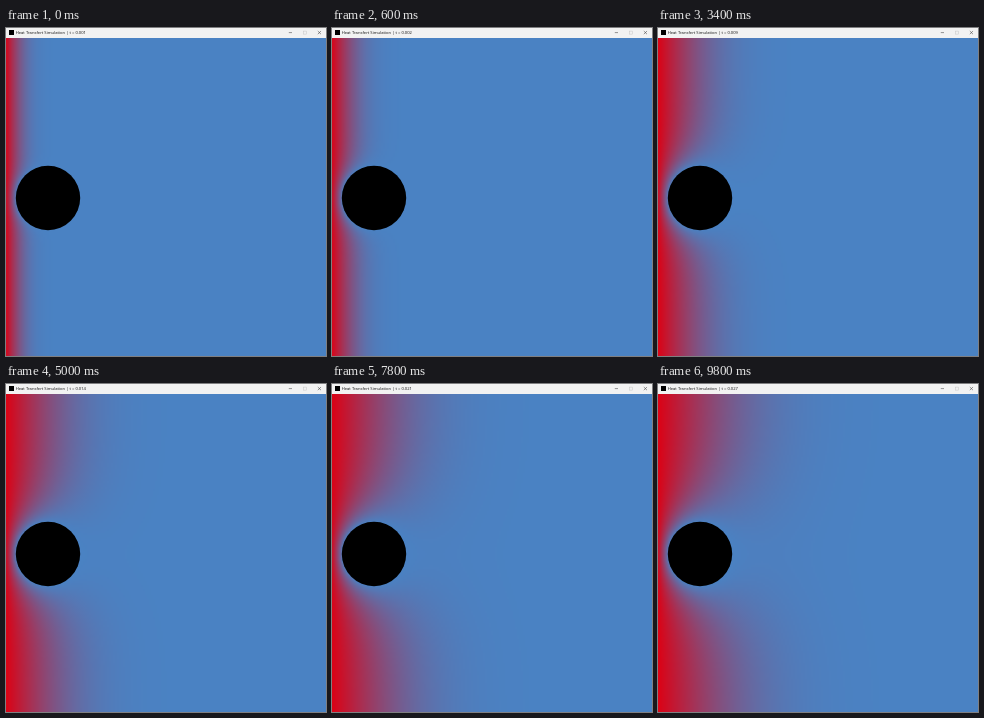
Recreate the animation shown at these times as an HTML page with a canvas. Size 320 by 328 pixels, loop 10 s.

```html
<!DOCTYPE html>
<html lang="en">
<head>
<meta charset="utf-8">
<title>Heat simulation</title>
<style>
  html, body { margin: 0; width: 100%; height: 100%; overflow: hidden; background: #4a82c3; }
  #stage { position: relative; width: 320px; height: 328px; overflow: hidden; }
  #heat { position: absolute; left: 0; top: 10px; width: 320px; height: 318px; }
  svg { position: absolute; inset: 0; }
  text { font: 4.15px "Open Sans", "Noto Sans", sans-serif; fill: #111; }
</style>
</head>
<body>
<div id="stage">
  <canvas id="heat" width="160" height="159"></canvas>
  <svg width="320" height="328" viewBox="0 0 320 328">
    <rect width="320" height="10" fill="#f2f2f2"/>
    <rect x="3" y="2" width="5" height="5" fill="#000"/>
    <text id="title" x="9.7" y="6.2"></text>
    <g fill="none" stroke="#333" stroke-width=".5">
      <path d="M282.8 4.6h3.2M311.8 3l3.2 3.2m0-3.2l-3.2 3.2"/>
      <rect x="297.6" y="3.1" width="3" height="3" stroke="#c4c4c4"/>
    </g>
    <circle cx="42" cy="170" r="32.2"/>
  </svg>
</div>
<script>
const start = performance.now();
const STEP = 200, FRAMES = 50, CELL = 2, COLS = 160, ROWS = 159;
const HOT = [222, 0, 18], COLD = [74, 130, 195];
const DISC = { x: 42, y: 160, r: 32 };

// Simulated time at a few frames; linear in between.
const clock = [[0, .0012], [3, .0026], [17, .0097], [25, .0142], [32, .0182], [39, .0217], [49, .0274]];
function simTime(frame) {
  const i = Math.max(1, clock.findIndex(([f]) => f >= frame));
  const [f0, t0] = clock[i - 1], [f1, t1] = clock[i];
  return t0 + (t1 - t0) * (frame - f0) / (f1 - f0);
}

// Grid with one border cell on each side; the left border is the heat source.
const W = COLS + 2, H = ROWS + 2;
let field = new Float32Array(W * H), next = new Float32Array(W * H);
const open = new Uint8Array(W * H);
for (let y = 0; y < H; y++) {
  field[y * W] = next[y * W] = 1;
  for (let x = 1; x <= COLS; x++) {
    const dx = (x - .5) * CELL - DISC.x, dy = (y - .5) * CELL - DISC.y;
    open[y * W + x] = Math.hypot(dx, dy) > DISC.r ? 1 : 0;
  }
}

function diffuse(k) {
  for (let y = 1; y <= ROWS; y++) {
    for (let i = y * W + 1, end = i + COLS; i < end; i++) {
      if (open[i]) {
        next[i] = field[i] + k * (field[i - 1] + field[i + 1] + field[i - W] + field[i + W] - 4 * field[i]);
      }
    }
    next[y * W + COLS + 1] = next[y * W + COLS];
  }
  next.copyWithin(0, W, 2 * W);
  next.copyWithin((H - 1) * W, (H - 2) * W, (H - 1) * W);
  [field, next] = [next, field];
}

const cellArea = (CELL / 320) ** 2;
const history = [];
for (let frame = 0, t = 0; frame < FRAMES; frame++) {
  const span = simTime(frame) - t;
  const steps = Math.ceil(span / (.24 * cellArea));
  for (let s = 0; s < steps; s++) diffuse(span / steps / cellArea);
  t += span;
  history.push(field.slice());
}

const ctx = document.getElementById("heat").getContext("2d");
const image = ctx.createImageData(COLS, ROWS);
const title = document.getElementById("title");

function draw(frame) {
  const heat = history[frame];
  for (let y = 0, p = 0; y < ROWS; y++) {
    for (let x = 0; x < COLS; x++, p += 4) {
      const u = heat[(y + 1) * W + x + 1];
      for (let c = 0; c < 3; c++) image.data[p + c] = COLD[c] + (HOT[c] - COLD[c]) * u;
      image.data[p + 3] = 255;
    }
  }
  ctx.putImageData(image, 0, 0);
  const shown = Math.floor(simTime(frame) * 1000) / 1000;
  title.textContent = `Heat Transfert Simulation | t = ${shown.toFixed(3)}`;
}

let current = -1;
function tick() {
  const frame = Math.floor((performance.now() - start) / STEP) % FRAMES;
  if (frame !== current) draw(current = frame);
  requestAnimationFrame(tick);
}
tick();
</script>
</body>
</html>
```
